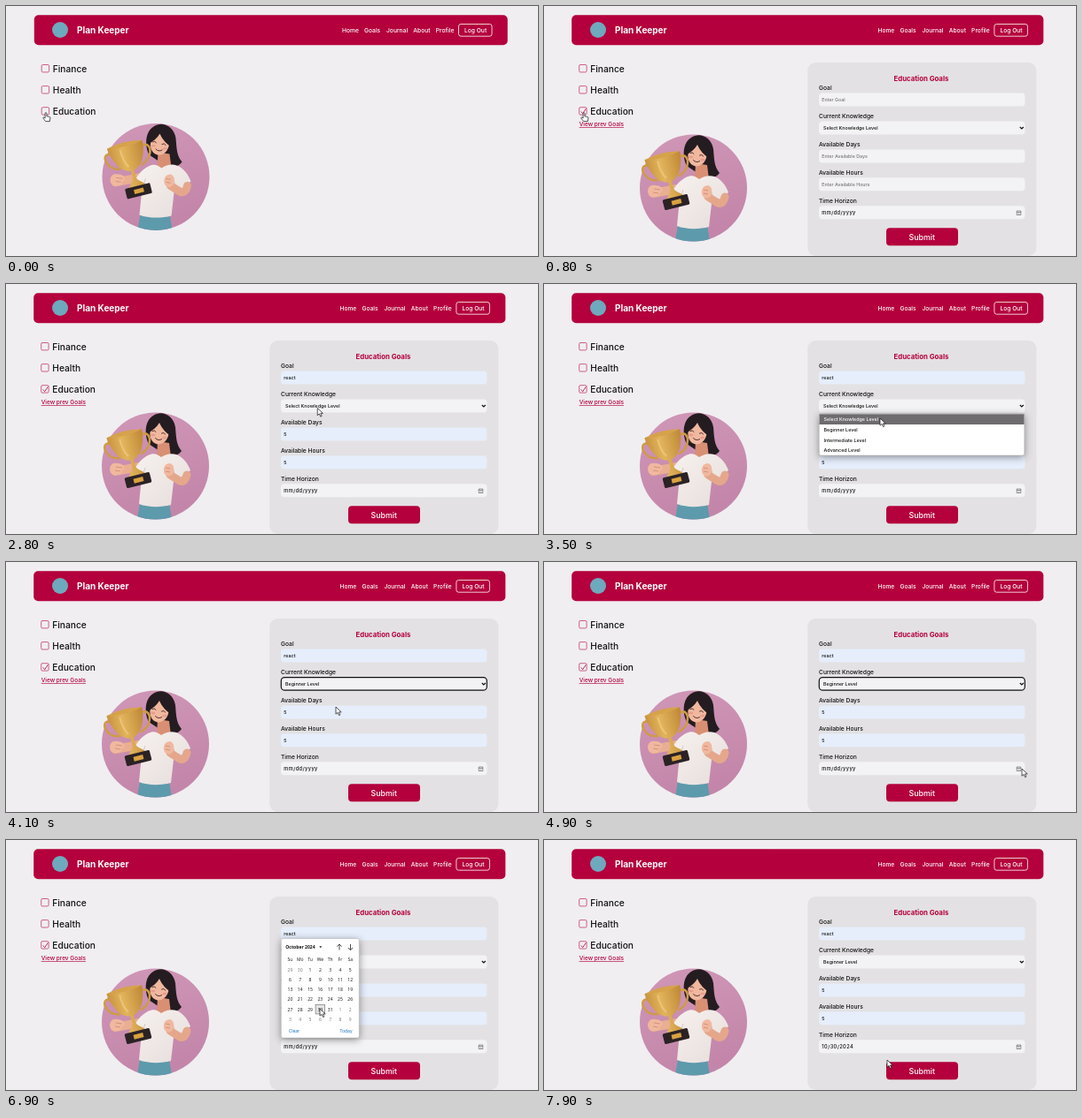
Animation, 600 px wide and 283 px high, one loop 8 s. Source, as an HTML page:

```html
<!DOCTYPE html>
<html lang="en">
<head>
<meta charset="utf-8">
<title>Goal form</title>
<style>
html, body { margin: 0; width: 100%; height: 100%; overflow: hidden; background: #f0eef1; }
svg { display: block; }
text { font: 500 6.7px Inter, Roboto, sans-serif; fill: #111; white-space: pre; }
.brand { font-size: 10px; font-weight: 700; fill: #fff; }
.nav text { fill: #fff; }
.side { font-size: 10.2px; }
.link { font-size: 6.5px; fill: #b4003c; text-decoration: underline; }
.title { font-size: 7.8px; font-weight: 700; fill: #b4003c; }
.value { font-size: 5.4px; }
.hint { font-size: 5.3px; fill: #77757a; }
.date { font-size: 5.7px; letter-spacing: .4px; }
.submit { font-size: 8.8px; fill: #fff; text-anchor: middle; }
.sys text { font: 5.05px "Open Sans", "Noto Sans", sans-serif; }
.sys .bold { font-weight: 700; }
.sys .soft { fill: #77757a; }
.sys .blue { fill: #0b6bb5; }
.sys .badge { font-size: 4.5px; fill: #445566; }
#days text { text-anchor: middle; }
.box { fill: none; stroke: #c53c68; stroke-width: .8; }
.panel { fill: #fff; filter: drop-shadow(0 2px 4px #0006); }
.line { fill: none; stroke: #222; stroke-width: .8; }
.icon { fill: none; stroke: #555; stroke-width: .6; }
.ring { fill: none; stroke: #111; stroke-width: 1.2; }
</style>
</head>
<body>
<svg id="stage" width="600" height="283" viewBox="0 0 600 283">
  <defs>
    <linearGradient id="pink" x2=".3" y2="1"><stop stop-color="#d097b7"/><stop offset="1" stop-color="#c386aa"/></linearGradient>
    <linearGradient id="gold"><stop stop-color="#c9943f"/><stop offset=".4" stop-color="#e2b45c"/><stop offset="1" stop-color="#bf8836"/></linearGradient>
    <linearGradient id="shirt" x2="1" y2="1"><stop stop-color="#f7f2ef"/><stop offset="1" stop-color="#e6dddb"/></linearGradient>
    <clipPath id="disc"><circle cx="168.5" cy="206" r="60.5"/></clipPath>
  </defs>
  <rect width="600" height="283" fill="#f0eef1"/>

  <rect id="bar" y="10.2" height="34" rx="5" fill="#b4003c"/>
  <circle cx="61" cy="27" r="9" fill="#6fa9bd"/>
  <text class="brand" x="80" y="30.5">Plan Keeper</text>
  <g class="nav" id="nav">
    <text x="379" y="29.5">Home</text><text x="404" y="29.5">Goals</text>
    <text x="429" y="29.5">Journal</text><text x="459.3" y="29.5">About</text>
    <text x="484.7" y="29.5">Profile</text>
    <rect x="510.5" y="20.5" width="37.5" height="13.7" rx="2.5" fill="none" stroke="#fff" stroke-width=".8"/>
    <text x="517" y="29.7">Log Out</text>
  </g>

  <g id="side"></g>
  <g data-show="400-8000">
    <path d="M41.7 119.4l2 2.3 3.6-5.4" fill="none" stroke="#b4003c" stroke-width=".8"/>
    <text class="link" x="39.7" y="136.2">View prev Goals</text>
  </g>

  <g id="art">
    <circle cx="168.5" cy="206" r="60.5" fill="url(#pink)"/>
    <path d="M151 248h33l4 24h-41z" fill="#5d9aac" clip-path="url(#disc)"/>
    <path d="M166 149c10-7 23 0 25 13 1 12 1 20 7 27-4 6-13 7-19 4l-18-12c-5-10-5-26 5-32z" fill="#241c20"/>
    <path d="M171 178l13 2 2 16h-16z" fill="#d98f74"/>
    <ellipse cx="173" cy="168.5" rx="10.500" ry="13" transform="rotate(12 173 168.500)" fill="#f0b89f"/>
    <path d="M160 169c-1-11 5-19 12-20 9 2 15 9 15 24-6-4-11-9-14-16-3 5-7 8-13 12z" fill="#241c20"/>
    <path d="M165 166.500q2.300-2 4 .8M175.500 169q2.500-1.800 4.200 1M168.500 174.500q3 3.600 7 1.200" fill="none" stroke="#3b2022" stroke-width=".9" stroke-linecap="round"/>
    <path d="M164.500 171h2.500M177.500 174h2.500" stroke="#e58b82" stroke-width="2.400" stroke-linecap="round" opacity=".6"/>
    <path d="M150 207L123 212" stroke="#eaae92" stroke-width="10" stroke-linecap="round"/>
    <path d="M160 194c6-3 10-2 15 2 5-3 11-5 17-3 8 3 13 10 16 18l-10 8-8-4-4 35c-11 3-26 3-36-1l3-31-3 4-8-6c4-10 10-18 18-22z" fill="url(#shirt)"/>
    <path d="M154 217l3-9M190 215l-2-9" stroke="#d3c7c7" stroke-width="1"/>
    <path d="M204 216q-2 9-8 7l-11-7" fill="none" stroke="#e5a78c" stroke-width="9" stroke-linecap="round" stroke-linejoin="round"/>
    <path d="M178 209q1-6 7-6 5 1 4 10-3 6-8 4-4-3-3-8z" fill="#f0b89f"/>
    <path d="M180 208l5 1M180 212l5 1" stroke="#cf8a72" stroke-width=".8"/>
    <g transform="translate(149 222) rotate(-14)">
      <path d="M-21-48c-7-2-8 4-6 9 2 6 7 9 13 10M16-49c8-2 9 5 7 10-2 6-6 9-13 11" fill="none" stroke="#cf9b45" stroke-width="2.500"/>
      <path d="M-23-55h41c0 8-3 17-6 22-3 5-7 8-11 9v8c0 4 7 7 9 11h-20c2-4 7-7 7-11v-8c-6-1-11-5-14-11-3-6-6-13-6-20z" fill="url(#gold)"/>
      <path d="M-23-55q20-5 41 0-20 5-41 0z" fill="#d6a24b"/>
      <path d="M-9-50q0 14 5 21" stroke="#f0cd86" stroke-width="2" fill="none" opacity=".7"/>
      <rect x="-14.500" y="-6" width="29" height="12" rx="1.500" fill="#2b2225"/>
      <rect x="-5" y="-2.500" width="11" height="5" fill="#d9a13f"/>
    </g>
    <path d="M121 203q8-1 12 3 2 4-2 5 0 5-6 5-7 1-8-6 0-5 4-7z" fill="#f0b89f"/>
    <path d="M124 207l7 1M123 211l6 1" stroke="#cf8a72" stroke-width=".8"/>
  </g>

  <g data-show="400-8000">
    <rect x="297.300" y="64" width="258" height="219" rx="9" fill="#e3e1e3"/>
    <text class="title" x="394.500" y="85.300">Education Goals</text>
    <g id="fields"></g>
    <path d="M536.800 137l2 2 2-2" fill="none" stroke="#111" stroke-width="1.200"/>
    <path class="icon" d="M533.200 232h4.600v4.500h-4.600zM533.200 233.400h4.600M534.700 235h1.600"/>
    <rect x="386" y="251.300" width="81" height="20" rx="4" fill="#b4003c"/>
    <text class="submit" x="426.300" y="264.500">Submit</text>
    <rect class="ring" data-show="1700-2600" x="310.300" y="98.600" width="232" height="14.800" rx="4"/>
    <path data-show="1700-2600" d="M313.300 102.500v7" stroke="#111" stroke-width=".6"/>
    <rect class="ring" data-show="4100-5100" x="310.300" y="130.600" width="232" height="14.600" rx="4"/>
    <path data-show="5500-6200" d="M534.800 200.600l1.400-2 1.400 2zM534.800 203l1.400 2 1.400-2z" fill="#555"/>
  </g>

  <g class="sys" data-show="1700-2600">
    <rect class="panel" x="310" y="114" width="179.500" height="125" rx="4"/>
    <rect id="saved" x="310" y="132" width="179.500" height="21" fill="#efeff1"/>
    <text class="soft" x="315.300" y="123.800">Saved personal info</text>
    <path class="line" d="M480.300 119.800l4.200 4.200m0-4.200l-4.200 4.200"/>
    <text class="bold" x="316" y="140.300">react</text>
    <rect x="335" y="134" width="27" height="9.500" rx="2" fill="#e8eef4"/>
    <text class="badge" x="338" y="140.300">Last Used</text>
    <text x="316" y="150">5  5</text>
    <text x="316" y="166.600">react</text><text x="316" y="181.800">english</text>
    <text x="316" y="197">java</text><text x="316" y="212.200">python</text>
    <path d="M310 219.300h179.500" stroke="#ddd" stroke-width=".8"/>
    <path class="line" d="M316.800 227.800a1.700 1.700 0 1 1 3.400 0 1.700 1.700 0 1 1-3.400 0M315.500 233q0-3 3-3"/>
    <rect x="318.800" y="230" width="3.600" height="3" fill="#222"/>
    <text x="327.500" y="231.700">Manage personal info in Pocket</text>
  </g>

  <g data-show="3200-4100">
    <rect class="panel" x="310.300" y="147" width="231.500" height="47" rx="2" stroke="#aaa" stroke-width=".5"/>
    <rect id="pick" x="310.600" width="230.900" height="11.700" fill="#6e6c6e"/>
    <g id="levels"></g>
  </g>

  <g class="sys" data-show="5100-7100">
    <rect class="panel" x="310.300" y="111.500" width="88" height="112.500" rx="2" stroke="#aaa" stroke-width=".5"/>
    <text class="bold" id="month" x="315.300" y="122.800"></text>
    <path d="M353.300 120.200h3l-1.500 2z" fill="#222"/>
    <path class="line" d="M376 124.500v-6.500m-2.600 2.600l2.600-2.600 2.600 2.600M388.500 118v6.500m-2.600-2.600l2.600 2.600 2.600-2.600"/>
    <rect id="today" fill="#686668" width="11" height="11"/>
    <rect id="hover" fill="#e4e4e6" stroke="#777" stroke-width=".7" width="10.500" height="10.500"/>
    <g id="days"></g>
    <text class="blue" x="319" y="218">Clear</text><text class="blue" x="376.500" y="218">Today</text>
  </g>

  <g id="cursor" stroke="#111" stroke-width=".7" stroke-linejoin="round" fill="#fff">
    <path id="arrow" d="M0 0v8.200l2-1.800 1.500 3.200 1.400-.6-1.400-3.100h2.700z"/>
    <path id="hand" d="M-.9.600c0-1.300 1.800-1.300 1.800 0v3.200l3 .6q1.200.3 1 1.600l-.6 3.600h-4.600l-2.700-3.400c-.6-1 .6-1.600 1.300-.9l.8.800z"/>
  </g>
</svg>
<script>
const LOOP = 8000, STEP = 100;
const T = { check: 400, open: 1700, fill: 2600, level: 4100, next: 6300, date: 7100 };
// pointer stops: time, x, y
const PATH = [
  [0, 45, 121], [1000, 45, 121], [1600, 374, 107], [1800, 378, 108], [2100, 378, 114],
  [2500, 345, 141], [2700, 345, 141], [3100, 385, 138], [3200, 385, 139], [3400, 379, 152],
  [3600, 379, 152], [3900, 372, 164], [4200, 372, 164], [4800, 539, 234], [5200, 539, 234],
  [5900, 387, 142], [6100, 388, 121], [6400, 388, 121], [6900, 354, 191], [7200, 354, 191],
  [7700, 387, 249], [LOOP, 387, 249]
];
const CELL = { x: 314.8, y: 141.2, w: 11.3, h: 11.2 };
const LEVELS = ['Select Knowledge Level', 'Beginner Level', 'Intermediate Level', 'Advanced Level'];
const $ = id => document.getElementById(id);

function add(parent, tag, attrs, text = '') {
  const el = document.createElementNS('http://www.w3.org/2000/svg', tag);
  set(el, attrs);
  el.textContent = text;
  return parent.appendChild(el);
}
function set(el, attrs) {
  for (const k in attrs) el.setAttribute(k, attrs[k]);
}
function show(el, on) {
  el.style.display = on ? '' : 'none';
}

['Finance', 'Health', 'Education'].forEach((name, i) => {
  const y = 74.5 + i * 24.1;
  add($('side'), 'rect', { class: 'box', x: 40.2, y: y - 8, width: 8.4, height: 8.4, rx: 1.3 });
  add($('side'), 'text', { class: 'side', x: 52.8, y }, name);
});

const fields = ['Goal', 'Current Knowledge', 'Available Days', 'Available Hours', 'Time Horizon'].map((name, i) => {
  const y = 98.6 + i * 31.9;
  add($('fields'), 'text', { x: 310, y: y - 3.7 }, name);
  const box = add($('fields'), 'rect', { x: 310, y, width: 232.5, height: 15, rx: 4 });
  const text = add($('fields'), 'text', { x: i === 1 ? 315 : 313.3, y: y + 9.5 });
  return { box, text };
});

function setField(i, value, cls, fill = '#f3f2f4') {
  const { box, text } = fields[i];
  box.setAttribute('fill', fill);
  text.setAttribute('class', cls);
  text.textContent = value;
}
function setInput(i, value, hint) {
  if (value) setField(i, value, 'value', '#e6eefc');
  else setField(i, hint, 'hint');
}

const levels = LEVELS.map((name, i) =>
  add($('levels'), 'text', { class: 'value', x: 315.5, y: 155.2 + i * 11.7 }, name));

const colX = c => CELL.x + (c + .5) * CELL.w;
['Su', 'Mo', 'Tu', 'We', 'Th', 'Fr', 'Sa'].forEach((d, c) =>
  add($('days'), 'text', { x: colX(c), y: 137 }, d));
const cells = Array.from({ length: 42 }, (_, i) =>
  add($('days'), 'text', { x: colX(i % 7), y: 148.8 + Math.floor(i / 7) * CELL.h }));

function drawCalendar(month, px, py) {
  const first = new Date(2024, month, 1).getDay();
  const col = Math.floor((px - CELL.x) / CELL.w), row = Math.floor((py - CELL.y) / CELL.h);
  const inside = col >= 0 && col < 7 && row >= 0 && row < 6;
  $('month').textContent = (month === 8 ? 'September' : 'October') + ' 2024';
  cells.forEach((el, i) => {
    const day = new Date(2024, month, 1 - first + i);
    const marked = month === 8 && i === 13;
    el.textContent = day.getDate();
    el.style.fill = marked ? '#fff' : day.getMonth() === month ? '#111' : '#77757a';
  });
  set($('today'), { x: CELL.x + 6 * CELL.w, y: CELL.y + CELL.h });
  show($('today'), month === 8);
  set($('hover'), { x: CELL.x + col * CELL.w + .4, y: CELL.y + row * CELL.h + .4 });
  show($('hover'), inside);
}

function pointerAt(t) {
  const i = PATH.findIndex(p => p[0] > t);
  const [t0, x0, y0] = PATH[i - 1], [t1, x1, y1] = PATH[i];
  const u = (t - t0) / (t1 - t0), e = u * u * (3 - 2 * u);
  return [x0 + (x1 - x0) * e, y0 + (y1 - y0) * e];
}

const timed = [...document.querySelectorAll('[data-show]')].map(el =>
  [el, ...el.dataset.show.split('-').map(Number)]);

function draw(t) {
  const [x, y] = pointerAt(t);
  const wide = t < T.check;
  timed.forEach(([el, from, to]) => show(el, t >= from && t < to));

  set($('bar'), wide ? { x: 31.8, width: 533.9 } : { x: 31.2, width: 532.1 });
  set($('nav'), { transform: `translate(${wide ? 0 : -2.6} 0)` });
  set($('side'), { transform: `translate(${wide ? 0 : -.5} 0)` });
  set($('art'), { transform: wide ? 'translate(.5 -12.6)' : '' });

  const filled = t >= T.fill;
  const preview = t >= T.open && y > 132 && y < 153;
  setInput(0, filled || preview ? 'react' : '', 'Enter Goal');
  setField(1, LEVELS[t >= T.level ? 1 : 0], 'value');
  setInput(2, filled ? '5' : '', 'Enter Available Days');
  setInput(3, filled ? '5' : '', 'Enter Available Hours');
  setField(4, t >= T.date ? '10/30/2024' : 'mm/dd/yyyy', 'date');
  show($('saved'), preview);

  const pick = Math.max(0, Math.min(3, Math.floor((y - 147.3) / 11.7)));
  set($('pick'), { y: 147.3 + pick * 11.7 });
  levels.forEach((el, i) => { el.style.fill = i === pick ? '#fff' : '#111'; });
  drawCalendar(t < T.next ? 8 : 9, x, y);

  set($('cursor'), { transform: `translate(${x} ${y})` });
  show($('hand'), x < 102);
  show($('arrow'), x >= 102);
}

function tick() {
  draw(Math.floor(performance.now() % LOOP / STEP) * STEP);
  requestAnimationFrame(tick);
}
tick();
</script>
</body>
</html>
```
